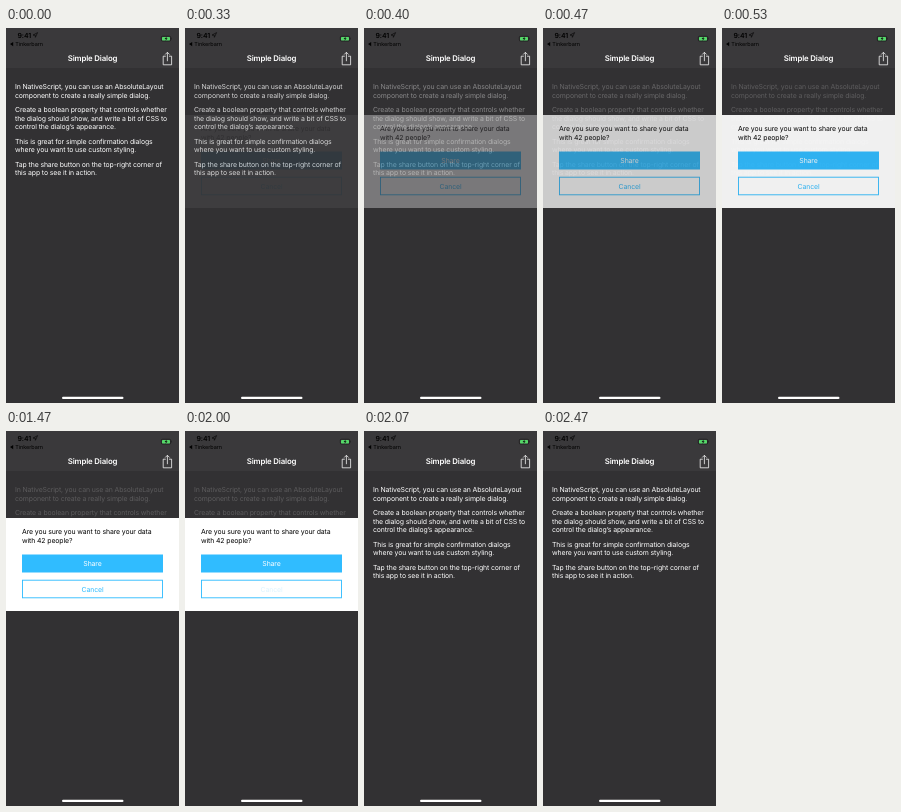
An HTML page that plays this animation: 173x375 px, repeating every 2790 ms.

```html
<!DOCTYPE html>
<html lang="en">
<head>
<meta charset="utf-8">
<title>Simple Dialog</title>
<style>
  html, body { margin: 0; width: 100%; height: 100%; overflow: hidden; background: #323133; }
  svg { display: block; width: 100vw; height: 100vh; }
  text {
    font: 6.92px Inter, "Liberation Sans", sans-serif;
    letter-spacing: -.117px;
    text-rendering: geometricPrecision;
  }
  .bold { font-weight: 600; }
  .title { font-size: 7.84px; letter-spacing: -.16px; }
  .back { font-size: 5.5px; letter-spacing: -.05px; }
  .mid { text-anchor: middle; }
  .page, .dialog, .cancel { animation: 2790ms step-end infinite; }
  .page { animation-name: dim; }
  .dialog { animation-name: show; }
  .cancel { animation-name: press; }

  /* The dialog eases in over 340 ms and is removed at once. */
  @keyframes show {
    0% { opacity: 0; }
    11.825% { opacity: .06; }
    14.335% { opacity: .35; }
    16.843% { opacity: .75; }
    18.994% { opacity: .93; }
    21.503% { opacity: .98; }
    24.012% { opacity: 1; }
    74.191%, 100% { opacity: 0; }
  }
  @keyframes dim {
    0% { opacity: 1; }
    11.825% { opacity: .8; }
    14.335% { opacity: .42; }
    16.843% { opacity: .26; }
    18.994% { opacity: .21; }
    21.503% { opacity: .2; }
    74.191%, 100% { opacity: 1; }
  }
  @keyframes press {
    0% { opacity: 1; }
    69.173% { opacity: .5; }
    71.682% { opacity: .17; }
    74.191%, 100% { opacity: 1; }
  }
</style>
</head>
<body>
<svg viewBox="0 0 173 375" preserveAspectRatio="none">
  <rect width="173" height="375" fill="#323133"/>
  <rect width="173" height="40" fill="#3a393b"/>

  <!-- status bar -->
  <text class="bold" x="11.5" y="10">9:41</text>
  <path d="M27 7.1 31.6 4.6 29.4 9.3 29.2 7.2Z" fill="none" stroke="#000" stroke-width=".6" stroke-linejoin="round"/>
  <path d="M7.2 13.9v4.4L4 16.1Z"/>
  <text class="back" x="9.2" y="18">Tinkerbarn</text>
  <rect x="155.3" y="8.2" width="9.4" height="4.9" rx="1.2" fill="none" stroke="#111" stroke-width=".5"/>
  <rect x="156" y="8.9" width="8" height="3.5" rx=".7" fill="#55d869"/>
  <path d="M160.7 8.4 158.6 10.9h1.3l-.5 2 2.2-2.6h-1.3Z" fill="#111"/>
  <path d="M165.2 9.9v1.5" stroke="#111" stroke-width=".5"/>

  <!-- title bar -->
  <text class="bold title mid" x="86.5" y="33" fill="#fff">Simple Dialog</text>
  <path d="M159.8 28.2h-2.6v8.6h8.4v-8.6H163M161.4 33.2v-8.8M159.2 26.5l2.2-2.2 2.2 2.2" fill="none" stroke="#fff" stroke-width=".75"/>

  <g class="page" fill="#fff">
    <text x="9" y="61.4">In NativeScript, you can use an AbsoluteLayout</text>
    <text x="9" y="69.8">component to create a really simple dialog.</text>
    <text x="9" y="84.3">Create a boolean property that controls whether</text>
    <text x="9" y="92.6">the dialog should show, and write a bit of CSS to</text>
    <text x="9" y="100.9">control the dialog’s appearance.</text>
    <text x="9" y="115.8">This is great for simple confirmation dialogs</text>
    <text x="9" y="124.1">where you want to use custom styling.</text>
    <text x="9" y="138.8">Tap the share button on the top-right corner of</text>
    <text x="9" y="147.1">this app to see it in action.</text>
  </g>

  <g class="dialog">
    <rect y="87" width="173" height="93" fill="#fff"/>
    <text x="16" y="103.2">Are you sure you want to share your data</text>
    <text x="16" y="111.5">with 42 people?</text>
    <rect x="16" y="123.5" width="141" height="18" fill="#30bcff"/>
    <text class="mid" x="86.5" y="135.1" fill="#fff">Share</text>
    <rect x="16.5" y="149.2" width="140" height="17.6" fill="none" stroke="#30bcff" stroke-width=".92"/>
    <text class="mid cancel" x="86.5" y="160.6" fill="#30bcff">Cancel</text>
  </g>

  <rect x="56" y="368.8" width="61.5" height="2.3" rx="1.15" fill="#fff"/>
</svg>
</body>
</html>
```
